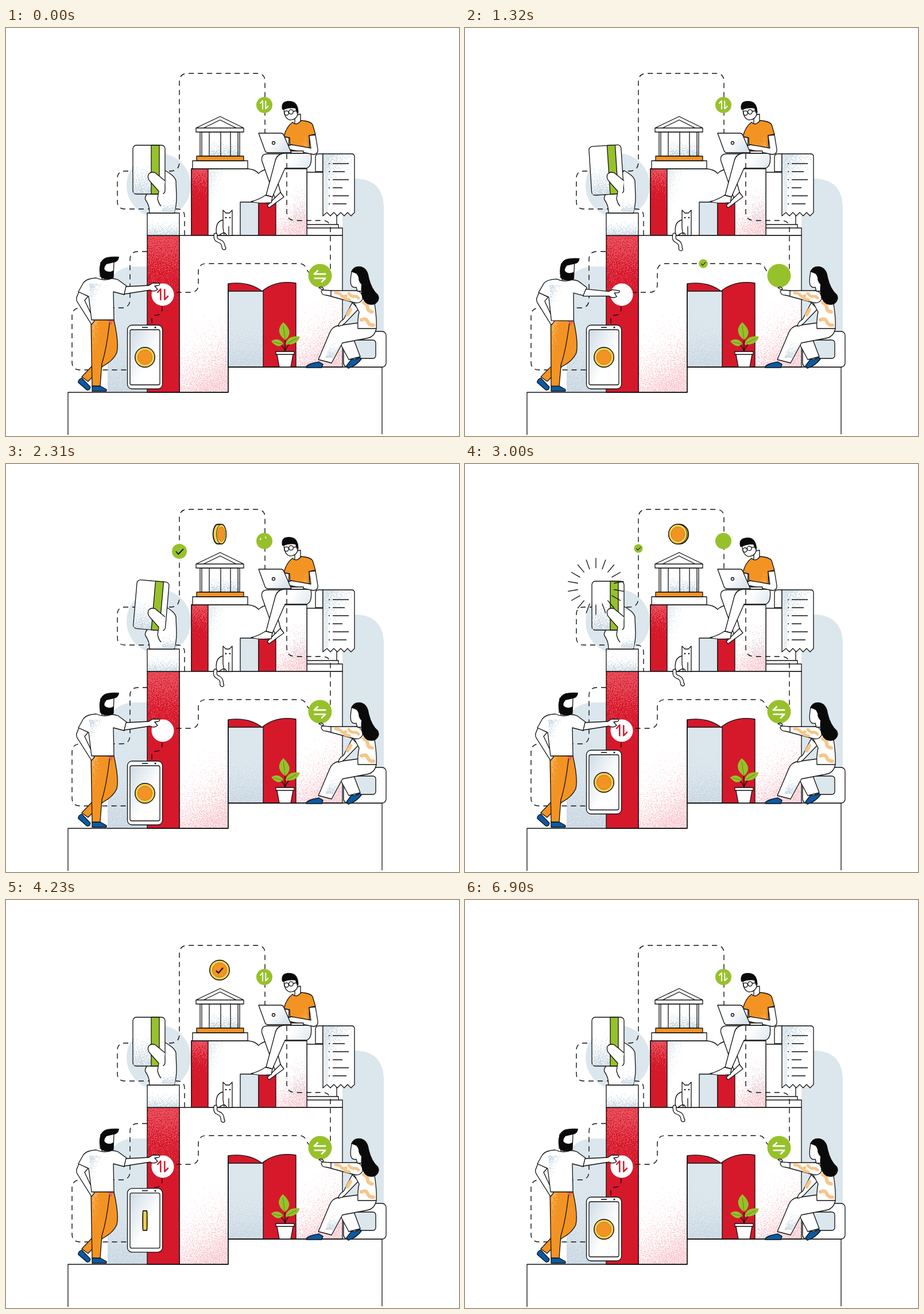
Animation, 789 px wide and 710 px high, one loop 6.93 s. Source, as an HTML page:

```html
<!DOCTYPE html>
<html lang="en">
<head>
<meta charset="utf-8">
<title>Digital payments</title>
<style>
html, body { margin: 0; width: 100%; height: 100%; overflow: hidden; background: #fff }
svg { display: block; width: 789px; height: 710px }
svg * { stroke-linejoin: round }
.l { stroke: #111; stroke-width: 1.3; fill: none }
.w { stroke: #111; stroke-width: 1.3; fill: #fff }
.r { stroke: #111; stroke-width: 1.3; fill: #d6182b }
.o { stroke: #111; stroke-width: 1.3; fill: #f39323 }
.b { fill: #dce6ed }
.s { stroke: #111; stroke-width: 1.3; fill: #0b5aa4 }
.k { fill: #0a0a0a }
.leaf { fill: #97c12b }
.d { fill: none; stroke: #111; stroke-width: 1.4; stroke-dasharray: 9 7 }
.grain { filter: url(#grain) }
.icon { fill: none; stroke-width: 2.3 }
.icon path { stroke-dasharray: 1 }
</style>
</head>
<body>
<svg viewBox="0 0 789 710">
<defs>
  <filter id="grain" x="0" y="0" width="1" height="1" color-interpolation-filters="sRGB">
    <feTurbulence type="fractalNoise" baseFrequency=".55" numOctaves="2" seed="4"/>
    <feColorMatrix values="0 0 0 0 0 0 0 0 0 0 0 0 0 0 0 0 0 0 1 0" result="n"/>
    <feComposite in="SourceAlpha" in2="n" operator="arithmetic" k2="1" k3="1" k4="-1"/>
    <feComponentTransfer result="m"><feFuncA type="linear" slope="9"/></feComponentTransfer>
    <feColorMatrix in="SourceGraphic" values="1 0 0 0 0 0 1 0 0 0 0 0 1 0 0 0 0 0 99 0"/>
    <feComposite in2="m" operator="in"/>
  </filter>
  <linearGradient id="pink" x1=".2" y1="0" x2=".6" y2="1">
    <stop stop-color="#f9ccd3" stop-opacity=".2"/><stop offset="1" stop-color="#f9ccd3" stop-opacity=".66"/>
  </linearGradient>
  <linearGradient id="rose" x2="0" y2="1">
    <stop stop-color="#e8505c" stop-opacity=".7"/><stop offset=".6" stop-color="#e8505c" stop-opacity=".2"/>
  </linearGradient>
  <linearGradient id="mist" x2="0" y2="1">
    <stop stop-color="#d3dfe8" stop-opacity=".15"/><stop offset="1" stop-color="#c9d7e2" stop-opacity=".66"/>
  </linearGradient>
  <linearGradient id="fog" x1=".1" x2=".8" y2="1">
    <stop stop-color="#c9d7e2" stop-opacity=".68"/><stop offset=".7" stop-color="#d3dfe8" stop-opacity=".2"/>
  </linearGradient>
  <linearGradient id="soft" y2="1"><stop stop-color="#cfdbe5"/><stop offset=".6" stop-color="#fff"/></linearGradient>
  <linearGradient id="shade" y2=".5"><stop stop-color="#fff"/><stop offset=".5" stop-color="#fff"/><stop offset="1" stop-color="#dbe4ec"/></linearGradient>
  <linearGradient id="sun" y2="1">
    <stop stop-color="#f8b766" stop-opacity=".7"/><stop offset=".6" stop-color="#f8b766" stop-opacity=".15"/>
  </linearGradient>
  <g id="coinArt">
    <path class="hull" fill="#f4d04e" stroke="#111" stroke-width="1.8"/>
    <ellipse class="face" ry="17" fill="#f4d04e" stroke="#111" stroke-width="1"/>
    <ellipse class="core" ry="12.5" fill="#f39323" stroke="#7a4a10" stroke-dasharray="1.5 1.3"/>
  </g>
</defs>

<!-- backdrop -->
<circle class="b" cx="266" cy="274" r="56"/>
<path class="b" d="M586 262H606Q658 262 658 314V590H586Z"/>
<path class="b" d="M177 634V465Q177 415 227 415H246V634Z"/>
<path class="grain" fill="url(#mist)" d="M177 634V465Q177 415 227 415H246V634Z"/>
<path class="d" id="dash1" d="M311 361V328Q311 315 298 315H207Q194 315 194 302V262Q194 249 207 249H286Q302 249 302 233V94Q302 79 317 79H437Q451 79 451 93V184"/>
<path class="d" id="dash4" d="M246 389H230Q216 389 216 403V472Q216 487 201 487H130Q115 487 115 502V581Q115 595 129 595H212"/>

<!-- receipt printer -->
<path class="w" d="M524 251H576V342H524ZM524 342H579V348H524ZM524 348H586V361H524Z"/>
<path class="w" d="M552 219H545Q539 219 539 225V250H552Z"/>
<path class="w" fill-opacity="1" d="M552 219H602Q607 219 607 224V321L601 327 595 321 589 327 583 321 577 327 571 321 565 327 559 321 552 327Z"/>
<path class="grain" fill="url(#fog)" d="M553 220H604V320H553Z"/>
<path class="b" opacity=".6" d="M553 220H561V319L553 325Z"/>
<path class="l" d="M569 236H597M569 250H590M569 264H597M569 278H586M569 292H597M569 306H593M562 236h2M562 250h2M562 264h2M562 278h2M562 292h2M562 306h2"/>

<!-- upper storey -->
<path class="w" d="M323 245H421Q434 246 440 253Q447 246 460 245H524V361H323Z"/>
<path class="grain" fill="url(#fog)" opacity=".5" d="M353 246H380V360H353Z"/>
<path class="grain" fill="url(#mist)" opacity=".8" d="M500 246H523V340H500Z"/>
<path class="grain" fill="url(#pink)" d="M471 280H523V360H471Z"/>
<path class="r" d="M323 245H352V361H323Z"/>
<path class="grain" fill="url(#rose)" d="M324 246H351V360H324Z"/>
<path class="l" style="fill:#dce6ed" d="M408 303H440V361H408Z"/>
<path class="r" d="M440 303H470V361H440Z"/>

<!-- bank -->
<path class="w" d="M325 231H421V245H325ZM338 181H407V223H338Z"/>
<path class="grain" fill="url(#mist)" d="M356 182H406V222H356Z"/>
<path class="l" d="M341 181V223M354 181V223M374 181V223M391 181V223M404 181V223"/>
<path class="o" d="M332 223H414V231H332Z"/>
<path class="w" d="M331 174L373 154 414 174V181H331ZM331 174H414M344 174L373 160 401 174"/>

<!-- coin over the bank -->
<g id="coin"><use href="#coinArt"/><path id="coinTick" fill="none" stroke="#111" stroke-width="2.2" pathLength="1" stroke-dasharray="1" d="M-6 1L-2 5 6 -4"/></g>

<!-- man with laptop -->
<path class="w" d="M446 232Q443 219 456 219H492L480 242 470 256 479 289 468 295Z"/>
<path class="w" d="M455 309L478 286 484 294 458 313Z"/>
<path class="w" style="fill:url(#shade)" d="M531 218H484Q472 219 469 231L453 291 464 294 486 244H524Q534 240 531 218Z"/>
<path class="w" d="M427 302Q440 299 452 291L464 294 462 304Q440 306 427 302Z"/>
<path class="w" d="M484 189L493 191 492 210 483 193Z"/>
<path class="w" d="M503 152V167Q508 170 513 164V150Z"/>
<g id="head">
  <path class="w" d="M484 139Q484 157 494 160Q508 160 509 145L506 138Z"/>
  <path class="k" d="M481 142Q478 128 491 127Q507 126 509 142L507 150 504 140Q494 138 484 142Z"/>
  <circle class="l" cx="488.500" cy="148" r="3.800"/><circle class="l" cx="496.500" cy="146" r="3.800"/><path class="l" d="M500 145L507 144"/>
</g>
<path class="o" d="M499 164Q506 171 514 161Q530 162 534 168L539 185 528 187 529 214 495 215 494 191 484 189Q488 172 499 164Z"/>
<path class="grain" fill="url(#sun)" transform="rotate(180 512 193)" d="M500 172H525V212H500Z"/>
<path class="w" d="M528 187L539 186 543 211Q544 220 535 220L492 211Q488 205 497 203L531 209Z"/>
<path class="w" d="M495 214H518V218H495Z"/>
<path class="w" style="fill:url(#shade)" d="M440 183H478Q483 183 484 187L497 217H457Q452 217 451 213Z"/>
<circle class="l" cx="466" cy="200" r="2.500"/>

<!-- main building -->
<path class="w" d="M302 361H586V590H387V634H302Z"/>
<path class="grain" fill="url(#pink)" d="M303 500H386V633H303Z"/>
<path class="grain" fill="url(#pink)" d="M506 470H585V589H506Z"/>
<path class="r" d="M246 361H302V634H246Z"/>
<path class="grain" fill="url(#rose)" d="M247 362H301V600H247Z"/>
<path class="r" d="M387 445Q422 440 446 458Q470 438 505 444V590H387Z"/>
<path class="l" style="fill:#dce6ed" d="M387 458H448V590H387Z"/>
<path class="grain" fill="url(#mist)" d="M388 459H447V589H388Z"/>
<path class="l" d="M108 708V634H387V445M387 590H655V707"/>
<path class="d" d="M489 219V320Q489 335 504 335H551Q565 335 565 349V428"/>
<path class="d" id="dash3" d="M530 428Q524 422 521 415Q518 410 510 410H349Q335 410 335 424V446Q335 460 321 460H290"/>
<path class="d" d="M272 484V488Q272 500 260 500Q254 500 254 506V518"/>

<!-- hand with card -->
<path class="w" d="M246 322H302V361H246Z"/>
<path class="grain" fill="url(#mist)" d="M247 323H301V360H247Z"/>
<path class="w" d="M250 322Q250 308 243 299Q241 295 246 288L277 248Q294 257 296 266L297 294Q297 310 293 322Z"/>
<g id="card">
  <rect class="w" x="221" y="204" width="56" height="85" rx="6"/>
  <path class="grain" fill="url(#mist)" d="M222 208H253V288H222Z"/>
  <path class="l" style="fill:#97c12b" d="M253 204H267V289H253Z"/>
</g>
<path class="w" d="M277 266L260 252Q252 249 248 255Q246 262 251 267L266 284 264 297Q266 306 270 310"/>
<path class="grain" fill="url(#mist)" d="M272 290H295V320H272Z"/>

<!-- cat -->
<path class="w" d="M367 361Q363 337 378 334V317L383 322H389L394 317V361Z"/>
<path class="l" d="M378 334V348L380 360M388 345V360M371 361Q382 352 384 361"/>
<circle class="k" cx="383" cy="330" r="1.300"/><circle class="k" cx="390" cy="330" r="1.300"/>
<g id="tail" fill="none" stroke-linecap="round">
  <path id="tailLine" d="M365 360C364 374 374 368 377 375C380 380 378 383 380 383" stroke="#111" stroke-width="7"/>
  <use href="#tailLine" id="tailFill"/>
  <path d="M365 360C364 374 374 368 377 375C380 380 378 383 380 383" stroke="#fff" stroke-width="4.500"/>
</g>

<!-- plant -->
<g id="plant">
  <path class="l" d="M486 564V540M486 562Q482 552 476 550M486 562Q490 552 498 546"/>
  <path class="leaf" d="M483 512Q467 528 486 543Q503 530 483 512ZM462 545Q474 537 483 549Q474 560 462 545ZM487 551Q490 534 512 537Q508 552 487 551Z"/>
  <path fill="none" stroke="#5d8a22" d="M483 518L486 542M466 546L481 550M490 549L506 540"/>
</g>
<path class="w" d="M472 568L476 590H496L500 568ZM470 563H502V568H470Z"/>

<!-- buttons -->
<circle class="leaf" cx="547" cy="431" r="20.500"/>
<circle fill="#fff" cx="273" cy="464" r="19.500"/>
<circle class="leaf" cx="450" cy="134" r="14"/>
<g class="icon" id="icon0" stroke="#fff" transform="translate(547 431) scale(1.15 -1.15) rotate(-90)"></g>
<g class="icon" id="icon1" stroke="#d6182b" transform="translate(272 464) scale(1.08)"></g>
<g class="icon" id="icon2" stroke="#fff" transform="translate(449 134) scale(.82)"></g>

<!-- seated woman -->
<rect class="w" x="588" y="528" width="74" height="62" rx="7"/>
<rect class="l" style="fill:#dce6ed" x="605" y="543" width="39" height="32" rx="5"/>
<path class="s" d="M593 588L602 576Q608 579 616 573L619 576Q610 588 596 592Z"/>
<path class="w" d="M600 543L581 547 597 577 617 572 606 543Z"/>
<path class="s" d="M523 589Q527 584 545 581L552 585 550 591H523Z"/>
<path class="w" d="M614 513L578 518Q568 520 564 530L544 577 567 583 586 548 628 540Q642 538 645 523Z"/>
<path class="grain" fill="url(#mist)" d="M572 532H610L590 542 570 574H556Z"/>
<g id="woman">
  <path class="w" d="M603 478L588 507Q580 511 579 519L586 517 590 514 614 489Z"/>
  <path class="w" d="M604 458L619 455Q634 470 642 480Q646 505 645 523L613 523Q612 508 615 494L604 474Z"/>
  <path fill="none" stroke="#f7c588" stroke-width="6" stroke-linecap="round" d="M623 478q7 3 7 9t8 7M619 508q8 -4 11 3t10 6M600 490l-5 9"/>
  <path class="w" d="M567 457L552 456 545 452Q551 449 553 454L549 458Q550 465 558 465L567 467Z"/>
  <path class="w" d="M566 457L612 457Q622 461 621 472Q617 480 607 478L566 467Z"/>
  <path fill="none" stroke="#f7c588" stroke-width="5" stroke-linecap="round" d="M574 461q7 0 10 4t8 1M597 462q5 6 9 5t8 3M590 471l8 2"/>
  <path class="w" d="M602 424Q599 440 601 447Q604 453 610 451L612 458H621L622 430Z"/>
  <path class="k" d="M601 424Q606 413 618 415Q630 418 632 434Q637 455 648 464Q653 474 642 481Q629 484 623 474Q617 463 619 446Q614 442 614 434Q612 426 601 424Z"/>
</g>

<!-- standing man -->
<path class="s" d="M132 609L147 625Q146 631 141 630L126 617Q125 612 132 609Z"/>
<path class="s" d="M150 623H164L175 629V632H150Z"/>
<g id="man">
  <path class="o" d="M168 508H188Q197 548 193 565Q187 579 168 589L143 615 132 607 151 587 172 548Z"/>
  <path class="o" d="M148 506L181 508Q175 560 167 584L164 623H150Z"/>
  <path class="grain" fill="url(#sun)" d="M150 510H172L164 610H152Z"/>
  <path fill="#e8606b" d="M178 509H187L183 517Z"/>
  <path class="w" d="M127 459L123 469Q122 474 125 478L149 516 154 510 137 474 143 467Z"/>
  <path class="w" d="M167 430V437Q174 441 181 437V430Z"/>
  <path class="w" d="M157 435Q140 436 135 443L126 459 144 467 149 508H188L187 459 206 464 210 449 195 438Q190 436 184 436Q171 441 157 435Z"/>
  <path class="grain" fill="url(#fog)" d="M145 445H168L160 506H150L146 468Z"/>
  <g id="arm">
    <path class="w" d="M209 450L249 448 255 444H267Q269 447 265 448L259 449 264 455Q258 460 251 456L206 463Z"/>
  </g>
  <path class="w" d="M165 408L164 432Q176 440 187 434L188 407Z"/>
  <path class="k" d="M163 426Q161 403 176 399Q187 397 197 398Q196 407 188 408L175 411Q170 417 172 421Q178 427 187 422V435Q178 440 166 435Z"/>
</g>

<!-- phone -->
<g id="phone">
  <rect class="w" x="211.500" y="517" width="61" height="111" rx="8"/>
  <rect class="l" style="fill:url(#soft)" x="216" y="525" width="52" height="96" rx="3"/>
  <path stroke="#111" stroke-width="1.600" d="M237 521H247"/><circle class="k" cx="260" cy="521" r="1.500"/>
  <g id="phoneCoin"><use href="#coinArt"/></g>
</g>

<path class="l" id="burst0" stroke-width="1.500"/>
<path class="l" id="burst1" stroke-width="1.500"/>
<g id="checks"></g>
</svg>

<script>
const LOOP = 6930, TAU = Math.PI * 2;
const $ = id => document.getElementById(id);
const set = (el, attr, v) => el.setAttribute(attr, v);
const move = (id, v) => set($(id), 'transform', v);

// coins need their own copies so that each can spin
for (const id of ['coin', 'phoneCoin']) {
  const use = $(id).querySelector('use'), art = $('coinArt').cloneNode(true);
  art.removeAttribute('id');
  use.replaceWith(art);
}
$('tailFill').remove();
for (let i = 0; i < 3; i++)
  $('icon' + i).innerHTML = ['M-8 -3L-2.500 -9V9', 'M4 -9V8L10 2']
    .map(d => `<path pathLength="1" d="${d}"/>`).join('');
$('checks').innerHTML = '<g><circle class="leaf" r="13"/><path fill="none" stroke="#111" stroke-width="1.8" d="M-6 0L-2 5 7 -4"/></g>'.repeat(3);

// eased 0 to 1 between a and b; bump rises over a..b and falls over c..d
const ease = (t, a, b) => {
  const x = Math.min(1, Math.max(0, (t - a) / (b - a)));
  return x * x * (3 - 2 * x);
};
const bump = (t, a, b, c, d) => ease(t, a, b) - ease(t, c, d);

function spin(id, angle) {
  const g = $(id), c = Math.cos(angle), rx = Math.max(.3, 17 * Math.abs(c));
  const d = 3.5 * Math.abs(Math.sin(angle)), x = -3.5 * Math.sin(angle) * Math.sign(c);
  set(g.querySelector('.hull'), 'd', `M${-d} -17H${d}A${rx} 17 0 0 1 ${d} 17H${-d}A${rx} 17 0 0 1 ${-d} -17Z`);
  for (const [cls, k] of [['.face', 1], ['.core', .735]]) {
    const e = g.querySelector(cls);
    set(e, 'cx', x);
    set(e, 'rx', rx * k);
  }
}

function burst(id, cx, cy, n, t, start) {
  const inner = 28 + 26 * ease(t, start + 150, start + 700);
  const outer = 28 + 24 * ease(t, start, start + 350);
  let d = '';
  if (t > start && outer > inner) for (let i = 0; i < n; i++) {
    const a = i / n * TAU - TAU / 4, c = Math.cos(a), s = Math.sin(a);
    d += `M${cx + inner * c} ${cy + inner * s}L${cx + outer * c} ${cy + outer * s}`;
  }
  set($(id), 'd', d);
}

function draw(t) {
  // people
  const press = bump(t, 800, 1200, 1700, 2150), windUp = bump(t, 250, 500, 600, 850);
  move('man', `translate(155 625) rotate(${.7 * press - windUp}) scale(1 ${1 - .01 * press}) translate(-155 -625)`);
  move('arm', `rotate(${8 * press - 3 * windUp} 195 447)`);
  move('woman', `rotate(${-1.5 * bump(t, 150, 500, 750, 1250)} 628 522)`);
  move('head', `rotate(${3 * bump(t, 300, 550, 800, 1150) - 5 * bump(t, 2500, 2850, 3200, 3600)} 506 160)`);
  move('tail', `rotate(${5 - 5 * Math.cos(t / LOOP * 2 * TAU)} 366 358)`);
  move('plant', `rotate(${-1.2 * Math.sin(t / LOOP * 3 * TAU) ** 2} 486 564)`);

  // card
  const swing = t > 1110 && t < 2710 ? 5 * Math.sin((t - 1910) / 1600 * TAU) : 0;
  move('card', `rotate(${swing} 258 290)`);
  burst('burst0', 228, 213, 18, t, 2720);

  // running dashes
  set($('dash1'), 'stroke-dashoffset', -96 * ease(t, 1500, 3600));
  set($('dash3'), 'stroke-dashoffset', -64 * ease(t, 800, 2100));
  set($('dash4'), 'stroke-dashoffset', -96 * ease(t, 750, 2880));

  // button icons are wiped off and drawn again
  [[700, 1000, 1800, 2150], [950, 1250, 2500, 2850], [2040, 2390, 3500, 3900]].forEach((times, i) => {
    const hidden = bump(t, ...times);
    for (const p of $('icon' + i).children) {
      set(p, 'stroke-dashoffset', hidden);
      set(p, 'visibility', hidden > .99 ? 'hidden' : 'visible');
    }
  });

  // green ticks
  [
    [415, 410, bump(t, 1150, 1450, 1850, 2150)],
    [302, 152 - 12 * ease(t, 2800, 3250), bump(t, 1800, 2100, 2800, 3250)],
    [445, 180, .8 * bump(t, 5050, 5350, 5750, 6050)]
  ].forEach(([x, y, k], i) =>
    set($('checks').children[i], 'transform', `translate(${x} ${y}) scale(${k})`));

  // coin over the bank
  move('coin', `translate(372 122) scale(${bump(t, 1900, 2200, 4800, 5200)})`);
  spin('coin', 11.5 * Math.min(1, Math.max(0, (3300 - t) / 1400)) ** 2.27);
  set($('coinTick'), 'stroke-dashoffset', 1 - ease(t, 3400, 3800));
  set($('coinTick'), 'visibility', t > 3410 ? 'visible' : 'hidden');

  // phone
  const bob = 13 + 6 * Math.cos((t - 3000) / 1250 * TAU) * (1 - (t - 3000) / 1900);
  move('phone', `translate(0 ${-bob * bump(t, 2450, 2900, 4350, 4900)})`);
  move('phoneCoin', 'translate(242 573)');
  spin('phoneCoin', 1.5 * TAU * ease(t, 3060, 5400));
  burst('burst1', 242, 573, 16, t, 5080);
}

function frame() {
  draw(performance.now() % LOOP);
  requestAnimationFrame(frame);
}
frame();
</script>
</body>
</html>
```
